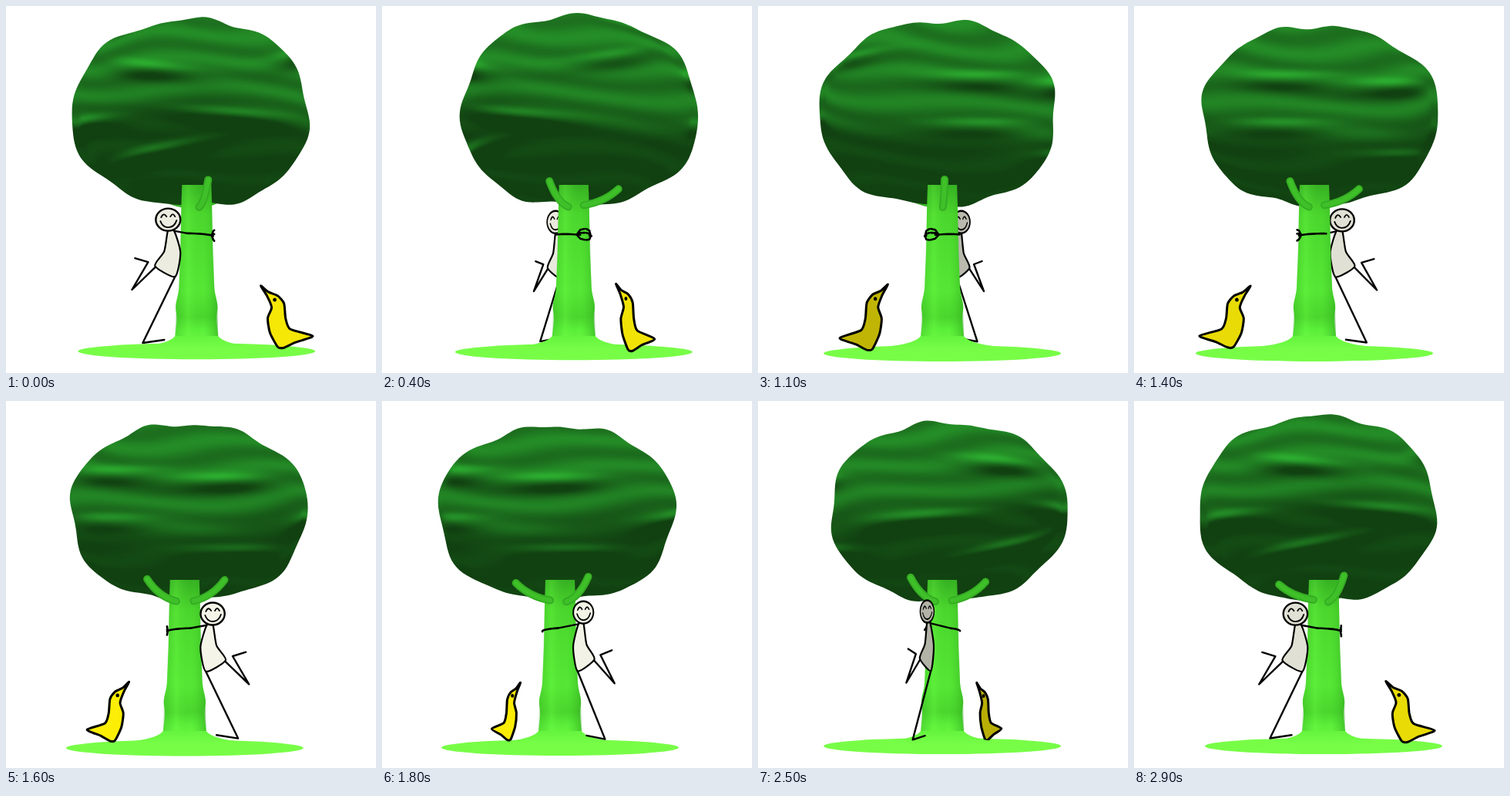
Write an HTML page with a canvas that moves like this. It is 480 px wide and 476 px high and loops after 3 s.

```html
<!DOCTYPE html>
<html lang="en">
<head>
<meta charset="utf-8">
<title>Tree hug</title>
<style>
html, body { margin: 0; width: 100%; height: 100%; overflow: hidden; background: #fff; }
svg, canvas { position: absolute; left: 0; top: 0; width: 100vw; height: 100vh; }
.ink { fill: none; stroke: #000; stroke-linecap: round; stroke-linejoin: round; }
</style>
</head>
<body>
<svg viewBox="0 0 480 476">
  <ellipse id="ground" rx="154" ry="10.5" fill="#78fd47"/>
  <g id="backBranches"></g>
</svg>
<canvas id="crown" width="480" height="476"></canvas>
<svg viewBox="0 0 480 476">
  <defs>
    <linearGradient id="bark" gradientUnits="userSpaceOnUse" x1="0" y1="232" x2="0" y2="446">
      <stop offset="0" stop-color="#36b022"/>
      <stop offset=".18" stop-color="#4bd62d"/>
      <stop offset=".64" stop-color="#56e835"/>
      <stop offset=".8" stop-color="#4bd62d"/>
      <stop offset=".88" stop-color="#5cf03a"/>
      <stop offset="1" stop-color="#78fd47"/>
    </linearGradient>
    <linearGradient id="side" gradientUnits="userSpaceOnUse" x1="-28" y1="0" x2="28" y2="0">
      <stop offset="0" stop-color="#279a18" stop-opacity=".25"/>
      <stop offset=".3" stop-color="#6cff45" stop-opacity=".3"/>
      <stop offset=".65" stop-color="#40c828" stop-opacity="0"/>
      <stop offset="1" stop-color="#279a18" stop-opacity=".5"/>
    </linearGradient>
  </defs>
  <g id="backActors"></g>
  <g id="trunk">
    <path fill="url(#bark)" d="M-19 232H19L20 265L21 320L23 366C24 378 28 384 27 394C25 404 26 412 28 428Q34 437 66 441Q0 452-66 441Q-34 437-28 428C-26 412-25 404-27 394C-28 384-24 378-23 366L-21 320L-20 265Z"/>
    <path fill="url(#side)" d="M-19 232H19L23 366C24 378 28 384 27 394L28 428H-28L-27 394C-28 384-24 378-23 366Z"/>
  </g>
  <g id="frontBranches"></g>
  <g id="frontActors"></g>
  <path id="arms" class="ink" stroke-width="2.6"/>
</svg>
<script>
const LOOP = 3000, STEP = 100, RAD = Math.PI / 180, HORIZON = 400;
const MID = 138, HALF = 153;            // crown centre height and half width
const BOX = { x: 50, y: 6, w: 380, h: 268 };
const $ = id => document.getElementById(id);
const cosd = a => Math.cos(a * RAD), sind = a => Math.sin(a * RAD);
const bell = (d, w) => Math.exp(-d * d / (w * w));
const clamp = (v, lo, hi) => Math.min(hi, Math.max(lo, v));
const n1 = v => v.toFixed(1);

// Main creases of the crown: longitude, height, slope
const creases = [[114, 76, -.22], [73, 136, -.2], [113, 184, .5], [20, 62, .25],
  [-67, 88, 0], [-122, 98, 0], [-61, 150, 0], [160, 146, .2], [-131, 190, 0]];

// Flat figures: distance from the trunk axis, height
const bird = [[83, 363], [93, 371], [105, 376], [113, 386], [115, 405], [121, 419], [150, 428],
  [128, 436], [113, 443], [105, 442], [95, 424], [92, 405], [97, 391], [91, 376]];
const torso = [[37, 290], [42, 318], [54, 337], [28, 351], [21, 320], [29, 292]];
const legs = [[[53, 338], [84, 368], [63, 332], [80, 327]], [[28, 351], [70, 437], [42, 433]]];

let cx = 240;

function project(u, y, angle) {
  const s = 1 / (1 - .001 * u * sind(angle));
  return [cx + u * cosd(angle) * s, HORIZON + (y - HORIZON) * s];
}
const at = p => n1(p[0]) + ' ' + n1(p[1]);
const line = pts => 'M' + pts.map(at).join('L');
const flat = (pts, angle) => pts.map(p => project(p[0], p[1], angle));

// Closed curve through all points
function smooth(pts, k) {
  const n = pts.length, g = i => pts[(i + n) % n];
  let d = 'M' + at(pts[0]);
  for (let i = 0; i < n; i++) {
    const a = g(i - 1), b = g(i), c = g(i + 1), e = g(i + 2);
    d += 'C' + at([b[0] + (c[0] - a[0]) / k, b[1] + (c[1] - a[1]) / k]) + ' ' +
      at([c[0] - (e[0] - b[0]) / k, c[1] - (e[1] - b[1]) / k]) + ' ' + at(c);
  }
  return d + 'Z';
}

// A rounded ellipse whose three lobes turn with the tree
function outline(phi) {
  const pts = [], top = 115 + 11 * cosd(phi - 60);
  for (let a = 0; a < 360; a += 4) {
    const c = Math.abs(cosd(a)), s = sind(a);
    const lon = (cosd(a) < 0 ? 180 : 0) - phi;
    const w = HALF + 9 * cosd(3 * (lon - 65));
    const h = s < 0 ? top : 120, p = s < 0 ? 2.1 : 2.3;
    const r = ((c / w) ** p + (Math.abs(s) / h) ** p) ** (-1 / p) +
      2.5 * sind(7 * a - phi) + 1.5 * sind(12 * a + 2 * phi);
    pts.push([cx + r * cosd(a), MID + r * s]);
  }
  return smooth(pts, 6);
}

// Brightness of the crown surface, 0 to 1
function glow(lon, y) {
  const brink = 150 - 22 * cosd(lon - 100) + 5 * sind(3 * lon);
  const low = 1 / (1 + Math.exp((brink - y) / 8));
  let v = .5 - .36 * low - .0008 * (y - 60);
  v += (.13 - .08 * low) * Math.sin(.17 * y + 2 * sind(lon) + sind(3 * lon + 2 * y));
  for (const [l, y0, slope] of creases) {
    const dl = (lon - l + 900) % 360 - 180;
    if (Math.abs(dl) > 60) continue;
    const d = y - y0 - slope * dl;
    v += bell(dl, 27) * (.36 * bell(d, 6) - .4 * bell(d - 15, 9));
  }
  return clamp(v, 0, 1);
}

const screen = $('crown').getContext('2d');
const skin = document.createElement('canvas');
skin.width = BOX.w / 2;
skin.height = BOX.h / 2;
const brush = skin.getContext('2d');
const image = brush.createImageData(skin.width, skin.height);

function drawCrown(phi) {
  let i = 0;
  for (let py = 0; py < skin.height; py++) {
    const y = BOX.y + 2 * py + 1;
    const reach = HALF * Math.sqrt(Math.max(.12, 1 - ((y - MID) / 128) ** 2));
    for (let px = 0; px < skin.width; px++) {
      const u = clamp((BOX.x + 2 * px + 1 - cx) / reach, -1, 1);
      const v = glow(Math.acos(u) / RAD - phi, y);
      image.data[i++] = 17 + 30 * v;
      image.data[i++] = 64 + 120 * v;
      image.data[i++] = 17 + 34 * v;
      image.data[i++] = 255;
    }
  }
  brush.putImageData(image, 0, 0);
  screen.clearRect(0, 0, 480, 476);
  screen.save();
  screen.clip(new Path2D(outline(phi)));
  screen.drawImage(skin, BOX.x, BOX.y, BOX.w, BOX.h);
  screen.restore();
}

function branch(a) {
  const foot = [cx + 13 * cosd(a), 258 + 3 * sind(a)];
  const bend = [cx + 40 * cosd(a), 254];
  const tip = [cx + 58 * cosd(a), 238 - 13 * Math.max(0, sind(a))];
  const stroke = (color, w) => `<path d="M${at(foot)}Q${at(bend)} ${at(tip)}" fill="none" ` +
    `stroke="${color}" stroke-width="${w}" stroke-linecap="round"/>`;
  return stroke('#35ad23', 10) + stroke('#3fc029', 6);
}

function drawBird(a, lit) {
  const c = [255, 240, 6].map(v => Math.round(v * lit));
  const eye = project(101, 381, a);
  return `<path d="${smooth(flat(bird, a), 9)}" fill="rgb(${c})" stroke="#000" stroke-width="3" stroke-linejoin="round"/>` +
    `<ellipse cx="${n1(eye[0])}" cy="${n1(eye[1])}" rx="${n1(1.2 + 1.2 * Math.abs(cosd(a)))}" ry="2.5"/>`;
}

function drawHugger(a, lit) {
  const v = Math.round(246 * lit), fill = `rgb(${v},${v},${v - 12})`;
  const head = project(37, 277, a), w = .1 + .9 * Math.abs(cosd(a));
  const limbs = legs.map(l => line(flat(l, a))).join('');
  const reach = [-60, 60].filter(s => sind(a + s) > -.15)
    .map(s => line([project(32, 291, a), project(23, 297, a + s)])).join('');
  return `<path class="ink" d="${limbs}${reach}" stroke-width="2.4"/>` +
    `<path d="${smooth(flat(torso, a), 9)}" fill="${fill}" stroke="#000" stroke-width="2.2" stroke-linejoin="round"/>` +
    `<g transform="translate(${at(head)}) scale(${w.toFixed(3)} 1)">` +
    `<ellipse rx="16" ry="14.5" fill="${fill}" stroke="#000" stroke-width="2.4"/>` +
    '<path class="ink" stroke-width="1.9" d="M-9-3Q-6-10-2-4M3-4Q6-10 9-4M-10 2Q-7 10 0 10Q8 10 11 1"/></g>';
}

// Both arms around the trunk, only where they face the viewer
function hug(a) {
  let d = '';
  const run = pts => {
    let pen = 'M';
    for (const [ang, y] of pts) {
      if (sind(ang) < -.15) { pen = 'M'; continue; }
      d += pen + at(project(23, y, ang));
      pen = 'L';
    }
  };
  for (const s of [-1, 1]) {
    const arm = [];
    for (let k = 60; k <= 160; k += 10) arm.push([a + s * k, 297 + (k - 60) * .02]);
    run(arm);
    for (const dy of [-8, -3, 6]) run([[a + s * 148, 299], [a + s * 160, 299 + dy * .8], [a + s * 176, 299 + dy]]);
  }
  return d;
}

function draw(t) {
  const phi = t / LOOP * 360;
  const birdAngle = phi + 8 - 6 * cosd(phi), hugAngle = phi + 181;
  const lit = .86 + .14 * cosd(2 * (phi - 22));
  cx = 240 + 9 * cosd(phi - 36);
  $('ground').setAttribute('cx', n1(cx));
  $('ground').setAttribute('cy', n1(449 + 1.5 * cosd(phi - 144)));
  $('trunk').setAttribute('transform', `translate(${n1(cx)} 0)`);
  drawCrown(phi);

  const layers = { back: ['', ''], front: ['', ''] };
  const side = a => layers[sind(a) < -.1 ? 'back' : 'front'];
  for (let k = 0; k < 3; k++) {
    const a = 75 + 120 * k + phi;
    side(a)[0] += branch(a);
  }
  side(birdAngle)[1] += drawBird(birdAngle, lit);
  side(hugAngle)[1] += drawHugger(hugAngle, lit);
  for (const name in layers) {
    $(name + 'Branches').innerHTML = layers[name][0];
    $(name + 'Actors').innerHTML = layers[name][1];
  }
  $('arms').setAttribute('d', hug(hugAngle));
}

const start = performance.now();
let shown = -1;
function tick() {
  const t = Math.floor(((performance.now() - start) % LOOP) / STEP) * STEP;
  if (t !== shown) draw(shown = t);
  requestAnimationFrame(tick);
}
tick();
</script>
</body>
</html>
```
